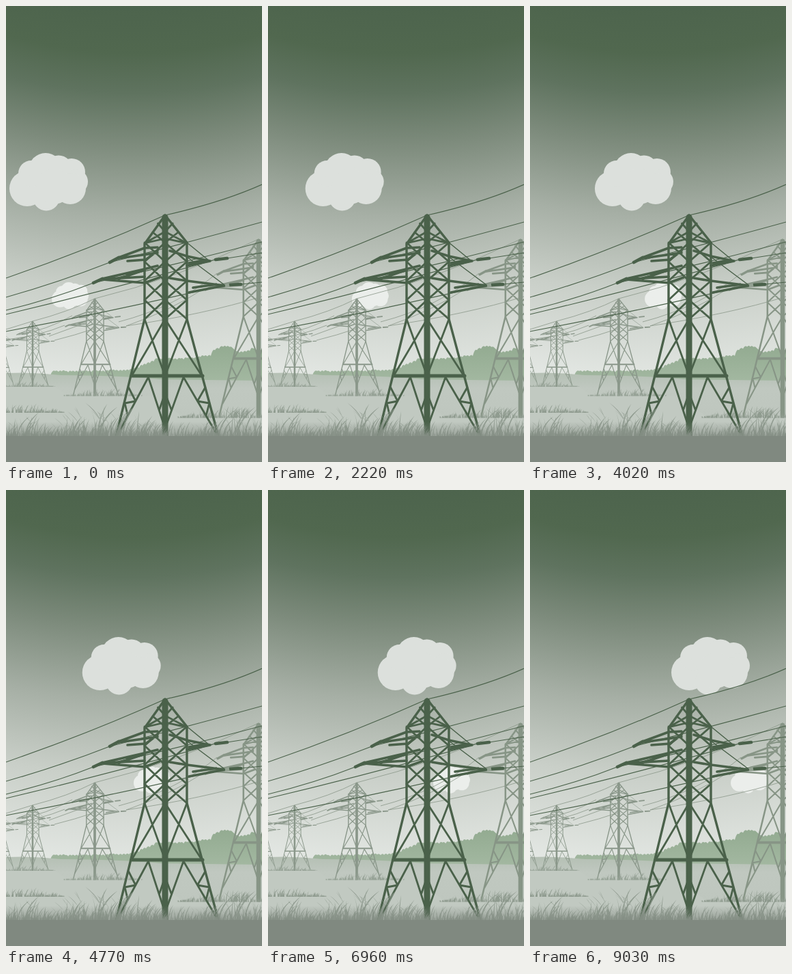
Animation, 375 px wide and 667 px high, one loop 9.06 s. Source, as an HTML page:

```html
<!DOCTYPE html>
<html lang="en">
<head>
<meta charset="utf-8">
<title>Power lines</title>
<style>
html, body { margin: 0; width: 100%; height: 100%; overflow: hidden; background: #808980; }
svg { display: block; width: 375px; height: 667px; }
.line { fill: none; stroke: currentColor; }
</style>
</head>
<body>
<svg viewBox="0 0 375 667">
  <defs>
    <radialGradient id="sky" gradientUnits="userSpaceOnUse" cx="187" cy="-600" r="1150" fx="187" fy="-600">
      <stop offset=".522" stop-color="#4d644d"/>
      <stop offset=".582" stop-color="#51684f"/>
      <stop offset=".632" stop-color="#5f735f"/>
      <stop offset=".697" stop-color="#7d8b7c"/>
      <stop offset=".788" stop-color="#a6afa5"/>
      <stop offset=".883" stop-color="#c9cfc8"/>
      <stop offset="1" stop-color="#e3e7e3"/>
    </radialGradient>
    <linearGradient id="trees" x1="0" y1="0" x2="0" y2="1">
      <stop offset="0" stop-color="#93ab91"/>
      <stop offset="1" stop-color="#a3b8a1"/>
    </linearGradient>
    <linearGradient id="field" x1="0" y1="0" x2="0" y2="1">
      <stop offset="0" stop-color="#b5c0b4"/>
      <stop offset=".25" stop-color="#c0c8c0"/>
      <stop offset=".8" stop-color="#bec6be"/>
      <stop offset="1" stop-color="#a9b3a9"/>
    </linearGradient>
    <linearGradient id="haze" x1="0" y1="0" x2="0" y2="1">
      <stop offset="0" stop-color="#808980" stop-opacity="0"/>
      <stop offset="1" stop-color="#808980" stop-opacity=".6"/>
    </linearGradient>
    <g id="cloud">
      <circle cx="31" cy="267" r="26"/>
      <circle cx="37" cy="245" r="19"/>
      <circle cx="58" cy="240" r="25"/>
      <circle cx="77" cy="239" r="20.5"/>
      <circle cx="96" cy="243" r="20"/>
      <circle cx="102" cy="257" r="18"/>
      <circle cx="94" cy="267" r="23"/>
      <circle cx="59" cy="280" r="19.5"/>
      <circle cx="70" cy="264" r="26"/>
    </g>
    <g id="tower" class="line" stroke-linecap="round" stroke-linejoin="round">
      <path stroke-width="9" d="M233 309V655"/>
      <path stroke-width="3.4" d="M155 655L203 458V348L233 306L265 346V458L318 655"/>
      <path stroke-width="2.8" id="lattice"/>
      <path stroke-width="5" d="M184 541H288"/>
      <path stroke-width="4.6" d="M152 375L165 368M128 405L141 399M307 371L324 369M328 408L344 407"/>
      <path stroke-width="3.6" d="M165 368L203 354L222 353M165 369L222 361M178 373L205 371L222 358
        M141 399L198 386L222 380M141 400L203 405L225 397M165 399L203 386M150 399L203 396
        M240 358L265 366L299 373L265 380M268 376L290 372
        M240 398L265 402L320 409L268 419M274 412L308 407"/>
      <path stroke-width="1.5" d="M265 346L298 373M265 367L320 408"/>
    </g>
  </defs>

  <rect width="375" height="548" fill="url(#sky)"/>
  <use href="#cloud" id="bigCloud" fill="#dce0dc"/>
  <use href="#cloud" id="smallCloud" fill="#ebeeeb"/>

  <path id="treeline" fill="url(#trees)"/>
  <path fill="url(#field)" d="M0 537Q40 535 80 540Q180 541 225 546L375 548V630H0Z"/>

  <g class="line" color="#8b978a" stroke-width=".8">
    <path d="M0 473L39 461Q90 448 130 428Q250 399 370 341M0 487L8 487Q50 482 86 467M18 481Q60 474 97 453
      M71 489Q100 482 132 471M63 483L118 463M176 468Q290 451 375 425M165 462Q250 440 309 391M176 468Q240 446 289 414"/>
  </g>
  <g color="#8a978a">
    <use href="#tower" transform="translate(-9 472) scale(.24) translate(-233 -305)"/>
    <use href="#tower" transform="translate(39 461) scale(.285) translate(-233 -305)"/>
    <use href="#tower" transform="translate(130 428) scale(.408) translate(-233 -305)"/>
  </g>
  <g color="#879586">
    <use href="#tower" transform="translate(370 341) scale(.74) translate(-233 -305)"/>
  </g>

  <path fill="#c1c9c1" d="M0 557H72L92 570.5H215L262 602.5H375V630H0Z"/>
  <g id="farGrass"></g>

  <g color="#4a614a">
    <path class="line" stroke-width="1.15" d="M0 398Q122 356 233 306Q317 287 375 261
      M0 426Q78 404 152 375Q270 345 375 316M0 445Q70 428 128 405Q260 376 375 345
      M0 451Q160 413 307 371M0 476Q160 446 320 408M324 369L375 361M344 407L375 404"/>
    <use href="#tower"/>
    <path class="line" color="#93a192" stroke-width="4" d="M321 409L327 408"/>
  </g>

  <g id="nearGrass"></g>
  <rect y="608" width="375" height="21" fill="url(#haze)"/>
  <rect y="629" width="375" height="38" fill="#808980"/>
</svg>
<script>
const LOOP = 9060, STEP = 30;
const byId = id => document.getElementById(id);

let seed = 11;
const random = () => (seed = (seed * 16807) % 2147483647) / 2147483647;

// Each face spans from an outer post to the corner post in the middle.
function drawLattice() {
  const middle = 233;
  const rows = [346, 374, 402, 430, 458];
  const face = (post, knee, foot) => {
    const between = f => post + (middle - post) * f;
    const half = (knee + middle) / 2;
    const lower = (f, y) => `${half + (foot - half) * f} ${y}`;
    let d = `M${post} 347L${middle} 340M${between(.4)} 331L${middle} 346M${between(.65)} 318L${middle} 330L${post} 347`;
    rows.slice(1).forEach((y, i) => {
      d += `M${post} ${rows[i]}L${middle} ${y}M${middle} ${rows[i]}L${post} ${y}`;
    });
    d += `M${post} 458L${middle} 541M${middle} 458L${knee} 541`;
    d += `M${half} 543L${foot} 630M${half} 543L${middle} 618`;
    d += `M${knee + (foot - knee) * .2} 558L${lower(.4, 578)}L${knee + (foot - knee) * .45} 581L${lower(.65, 599)}`;
    return d + `M${middle} 566L${(half + middle * 2) / 3} 590`;
  };
  byId("lattice").setAttribute("d", face(203, 184, 162) + face(265, 287, 311));
}

function drawTrees() {
  const crest = [[65, 538], [72, 535], [120, 535], [185, 533], [205, 525], [222, 517],
    [265, 516], [285, 514], [300, 511], [306, 503], [318, 498], [332, 500], [337, 506],
    [352, 506], [362, 502], [376, 504]];
  let d = "M65 540";
  crest.slice(1).forEach(([x, y], i) => {
    const [px, py] = crest[i];
    const count = Math.max(1, Math.round((x - px) / 5));
    for (let k = 1; k <= count; k++) {
      const f = k / count;
      const ey = py + (y - py) * f + (random() - .5) * 2;
      d += `Q${px + (x - px) * (f - .5 / count)} ${ey - 3} ${px + (x - px) * f} ${ey}`;
    }
  });
  byId("treeline").setAttribute("d", d + "V550H225L65 541Z");
}

// Blades are tallest in the middle of a tuft, and most of them are short.
function tuft(parent, x0, x1, base, height, count, color, opacity = 1) {
  let d = "";
  for (let i = 0; i < count; i++) {
    const f = random();
    const x = x0 + (x1 - x0) * f;
    const h = height * (.15 + .85 * random() ** 1.5 * Math.sin(Math.PI * f));
    const lean = (random() - .5) * h * 1.3;
    const w = .4 + height / 90;
    d += `M${x - w} ${base}Q${x} ${base - h * .6} ${x + lean} ${base - h}Q${x + w} ${base - h * .5} ${x + w} ${base}Z`;
  }
  const path = document.createElementNS("http://www.w3.org/2000/svg", "path");
  path.setAttribute("d", d);
  path.setAttribute("fill", color);
  path.setAttribute("opacity", opacity);
  byId(parent).append(path);
}

function place(id, x, y, scale) {
  byId(id).setAttribute("transform", `translate(${x} ${y}) scale(${scale})`);
}

function render(time) {
  const t = Math.floor((time % LOOP) / STEP) * STEP;
  place("bigCloud", t * .02237, 0, 1);
  place("smallCloud", 64.7 + t * .02514, 303, .47);
}

drawLattice();
drawTrees();
tuft("farGrass", -10, 72, 557, 9, 150, "#98a498");
tuft("farGrass", 85, 200, 570.5, 13, 190, "#96a296");
tuft("farGrass", -30, 85, 595, 15, 210, "#8f9b8f");
tuft("farGrass", 252, 400, 602.5, 18, 230, "#8f9b8f");
tuft("nearGrass", -40, 415, 630, 26, 420, "#8a968a", .85);
tuft("nearGrass", -10, 70, 630, 36, 70, "#8a968a", .85);
tuft("nearGrass", 60, 235, 630, 52, 170, "#8a968a", .85);
tuft("nearGrass", 270, 400, 630, 48, 110, "#8a968a", .85);

const start = performance.now();
function tick() {
  render(performance.now() - start);
  requestAnimationFrame(tick);
}
render(0);
requestAnimationFrame(tick);
</script>
</body>
</html>
```
